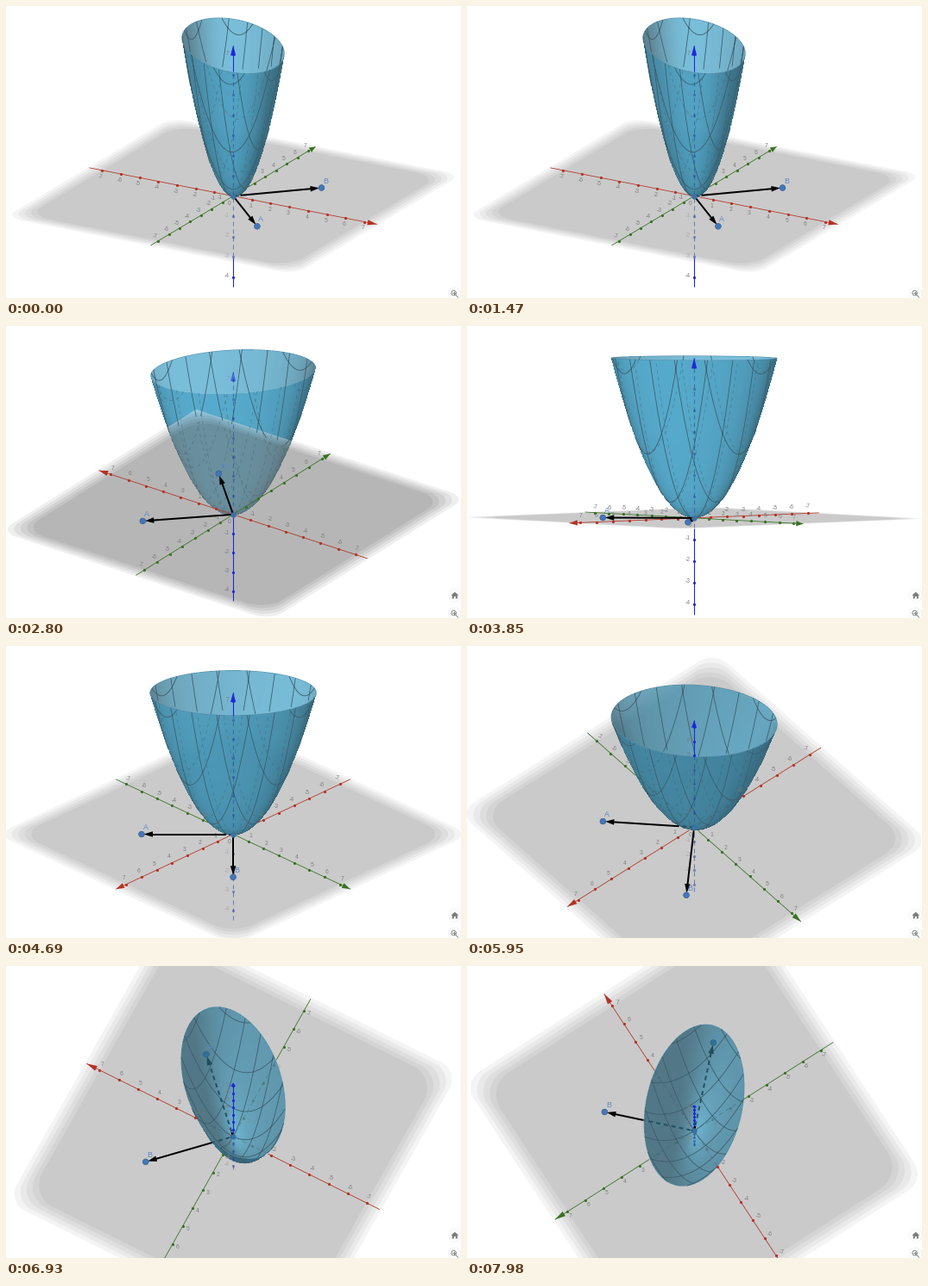
Write a matplotlib script that moves like this. It is 527 px wide and 339 px high and loops after 8 s.

```python
import numpy as np
import matplotlib.pyplot as plt
from matplotlib.animation import FuncAnimation
from matplotlib.patches import Circle, Polygon

W, H, DPI = 527, 339, 100
LOOP, STEP = 8000, 50
CX, CY, S = 263.1, 185.4, 25.0      # rotation centre and pixels per unit
ZC = 1.5                            # height of the rotation centre
ZTOP, REACH = 7.43, 7.68
ZLOW, ZHIGH = -4.5, 7.45
PX = 72 / DPI

# time (ms), azimuth, elevation
VIEW = np.array([
    (0, 330.2, 20.1), (1500, 330.2, 20.1), (1680, 332, 6), (2100, 290, -6),
    (2520, 222, -24), (2800, 215.9, -27), (3300, 218, -24), (4000, 222, 10),
    (4600, 225, 28), (4700, 225, 28), (5040, 223, 38), (5880, 220.3, 45.8),
    (5950, 220.1, 48.3), (6930, 152.1, 70.4), (7980, 122.9, 80.8)])

fig = plt.figure(figsize=(W / DPI, H / DPI), dpi=DPI, facecolor="white")
ax = fig.add_axes([0, 0, 1, 1])
ax.axis("off")


def rgb(*c):
    return tuple(v / 255 for v in c)


def form(p, q):
    """Bilinear form of x^2 + xy + y^2."""
    return p[0] * q[0] + p[1] * q[1] + (p[0] * q[1] + p[1] * q[0]) / 2


class Camera:
    def __init__(self, az, el):
        a, e = np.radians([az, el])
        ca, sa, ce, se = np.cos(a), np.sin(a), np.cos(e), np.sin(e)
        self.right = np.array([ca, -sa, 0])
        self.up = np.array([sa * se, ca * se, ce])
        self.eye = np.array([-sa * ce, -ca * ce, se])

    def project(self, p):
        q = np.array(p, float)
        q[2] = q[2] - ZC
        return np.array([CX + S * np.tensordot(self.right, q, 1),
                         CY - S * np.tensordot(self.up, q, 1)])

    def hits(self, p):
        """Ray parameters where the view ray through p meets the bowl."""
        v = self.eye
        a = form(v, v)
        b = 2 * form(p, v) - v[2]
        c = form(p, p) - p[2]
        disc = b * b - 4 * a * c
        root = np.sqrt(np.maximum(disc, 0))
        for t in ((-b - root) / (2 * a), (-b + root) / (2 * a)):
            yield t, (disc > 0) & (p[2] + t * v[2] <= ZTOP)

    def hidden(self, p):
        p = np.asarray(p, float)
        out = np.zeros(p.shape[1:], bool)
        for t, ok in self.hits(p):
            out |= ok & (t > 0.03)
        t = -p[2] / self.eye[2]
        x, y = p[0] + t * self.eye[0], p[1] + t * self.eye[1]
        return out | ((t > 0.03) & (abs(x) < 7.2) & (abs(y) < 7.2))


# ---- plane -------------------------------------------------------------
def rounded_square(h, r):
    th = np.linspace(0, 2 * np.pi, 80, endpoint=False) + 0.01
    x = (h - r) * np.sign(np.cos(th)) + r * np.cos(th)
    y = (h - r) * np.sign(np.sin(th)) + r * np.sin(th)
    return np.array([x, y, 0 * x])


# a pale veil with sharp corners, then a soft-edged shadow
BANDS = [rounded_square(7.7, 0)]
BANDS += [rounded_square(h, r) for h, r in
          zip(np.linspace(7.75, 6.98, 5), np.linspace(0.95, 1.25, 5))]
plane = [ax.add_patch(Polygon([(0, 0)], closed=True, lw=0, fc="black"))
         for _ in BANDS]
plane[0].set(facecolor="white", alpha=0.38)

# ---- bowl --------------------------------------------------------------
X0, X1, Y0, Y1 = 160, 368, 6, 264
gx, gy = np.meshgrid(np.arange(X0, X1) + 0.5, np.arange(Y0, Y1) + 0.5)
bowl = ax.imshow(np.zeros((Y1 - Y0, X1 - X0, 4)), extent=(X0, X1, Y1, Y0),
                 interpolation="nearest", zorder=2, aspect="auto")
ax.set_xlim(0, W)
ax.set_ylim(H, 0)
TINT = np.array(rgb(83, 182, 222))


def shade(cam):
    u, w = (gx - CX) / S, (CY - gy) / S
    p = cam.right[:, None, None] * u + cam.up[:, None, None] * w
    p[2] += ZC
    v = cam.eye
    light = -0.35 * cam.right + 0.1 * cam.up + 0.85 * v
    col = np.zeros(gx.shape + (3,))
    alpha = np.zeros(gx.shape)
    for t, ok in cam.hits(p):
        x, y = p[0] + t * v[0], p[1] + t * v[1]
        nx, ny = -(2 * x + y), -(x + 2 * y)
        size = np.sqrt(nx * nx + ny * ny + 1)
        face = np.sign(nx * v[0] + ny * v[1] + v[2])
        lit = (nx * light[0] + ny * light[1] + light[2]) * face / size
        lum = 0.51 + 0.46 * np.maximum(lit, 0)
        cover = 0.75 * ok
        col = (col * (1 - cover[..., None])
               + TINT * (lum * cover)[..., None])
        alpha = alpha + cover * (1 - alpha)
    col = col / np.maximum(alpha, 1e-6)[..., None]
    return np.dstack([np.clip(col, 0, 1), alpha])


def mesh_curves():
    gap = np.full((3, 1), np.nan)
    parts = []
    for k in range(-3, 4):
        half = np.sqrt(max(ZTOP - 0.75 * k * k, 0))
        s = -k / 2 + half * np.linspace(-1, 1, 90)
        z = k * k + k * s + s * s
        c = np.full_like(s, k)
        parts += [np.array([c, s, z]), gap, np.array([s, c, z]), gap]
    return np.hstack(parts)


MESH = mesh_curves()
th = np.linspace(0, 2 * np.pi, 160)
big, small = np.sqrt(ZTOP) * np.cos(th), np.sqrt(ZTOP / 3) * np.sin(th)
RIM = np.array([big + small, -big + small, ZTOP + 0 * th])


class Stroke:
    """A space curve: solid where seen, dashed where covered."""

    def __init__(self, color, lw, back, back_alpha, dash=(4, 4), z=7):
        self.front, = ax.plot([], [], color=color, lw=lw * PX, zorder=z,
                              solid_capstyle="butt")
        self.back, = ax.plot([], [], color=back, lw=lw * PX,
                             alpha=back_alpha, zorder=z - 1,
                             ls=(0, tuple(d / lw for d in dash)),
                             dash_capstyle="butt")

    def set(self, cam, pts):
        x, y = cam.project(pts)
        hid = cam.hidden(pts)
        self.front.set_data(np.where(hid, np.nan, x), y)
        self.back.set_data(np.where(hid, x, np.nan), y)


INK = rgb(60, 92, 106)
mesh = Stroke(INK, 0.8, INK, 0.45)
rim, = ax.plot([], [], color=rgb(80, 140, 168), lw=0.6 * PX, zorder=6)


# ---- axes --------------------------------------------------------------
def label(text, size, color, z):
    return ax.text(0, 0, text, size=size * PX, color=color, ha="center",
                   va="center", family="Liberation Sans", zorder=z)


def cone(tip, base, half):
    d = tip - base
    n = np.array([-d[1], d[0]]) / max(np.hypot(*d), 1e-6) * half
    return [tip, base + n, base - n]


NUM = rgb(125, 125, 125)


class Axis:
    def __init__(self, k, lo, hi, color, back, lw):
        self.k = k
        self.unit = np.eye(3)[:, [k]]
        self.line = self.unit * np.linspace(lo, hi, 240)
        self.tip = self.unit * hi
        nums = [n for n in range(-7, 8) if n and lo < n < hi]
        self.ticks = self.unit * np.array(nums, float)
        self.stroke = Stroke(color, lw, back, 0.55, dash=(5, 4), z=8)
        dot = dict(ls="", marker="o", mec="none")
        self.seen, = ax.plot([], [], ms=3.2 * PX, color=color, zorder=9, **dot)
        self.covered, = ax.plot([], [], ms=3.2 * PX, color=back, alpha=0.5,
                                zorder=8, **dot)
        self.head = ax.add_patch(Polygon([(0, 0)], fc=color, lw=0, zorder=9))
        self.text = [label(str(n), 6.8, NUM, 9) for n in nums]

    def set(self, cam):
        self.stroke.set(cam, self.line)
        x, y = cam.project(self.ticks)
        hid = cam.hidden(self.ticks)
        self.seen.set_data(x[~hid], y[~hid])
        self.covered.set_data(x[hid], y[hid])
        tip = cam.project(self.tip)[:, 0]
        base = cam.project(self.tip - 0.5 * self.unit)[:, 0]
        self.head.set_xy(cone(tip, base, 3.1))
        self.head.set_alpha(0.55 if cam.hidden(self.tip)[0] else 1)
        if self.k == 2:
            dx, dy = -7, -1
        else:                       # numbers sit beside the axis
            d = (tip - base) / np.hypot(*(tip - base))
            side = (7.5, -6.5)[self.k]
            dx, dy = -d[1] * side, d[0] * side
        for t, px, py, h in zip(self.text, x, y, hid):
            t.set_position((px + dx, py + dy))
            t.set_alpha(0.4 if h else 0.95)


axes3 = [Axis(0, -REACH, REACH, rgb(180, 50, 35), rgb(80, 95, 105), 0.8),
         Axis(1, -REACH, REACH, rgb(55, 115, 35), rgb(55, 105, 105), 0.8),
         Axis(2, ZLOW, ZHIGH, rgb(30, 40, 215), rgb(35, 70, 160), 1.1)]
zero = label("0", 6.8, NUM, 9)
origin, = ax.plot([], [], "o", ms=6.4 * PX, mec="none", color=rgb(60, 112, 165),
                  zorder=13)


# ---- vectors -----------------------------------------------------------
class Vector:
    DIM = rgb(32, 78, 96)

    def __init__(self, name, end):
        self.end = np.array(end, float)[:, None]
        self.stroke = Stroke("black", 2.0, self.DIM, 0.95, (5, 4), z=11)
        self.head = ax.add_patch(Polygon([(0, 0)], lw=0, zorder=11))
        self.dot = ax.add_patch(Circle((0, 0), 3.4, lw=0.4, zorder=12))
        self.text = label(name, 9, rgb(95, 138, 200), 12)

    def set(self, cam):
        p = cam.project(self.end)[:, 0]
        o = cam.project(np.zeros((3, 1)))[:, 0]
        length = max(np.hypot(*(p - o)), 20)
        way = (p - o) / length
        self.stroke.set(cam, self.end * np.linspace(0, 1 - 11 / length, 120))
        hid = cam.hidden(self.end)[0]
        self.head.set_xy(cone(p - 2.5 * way, p - 13 * way, 3.3))
        self.head.set_facecolor(self.DIM if hid else "black")
        self.dot.center = tuple(p)
        self.dot.set_facecolor(rgb(48, 112, 150) if hid else rgb(68, 118, 184))
        self.dot.set_edgecolor(rgb(45, 90, 140))
        self.text.set_position(tuple(p + (4.5, -8)))


vectors = [Vector("A", (3, -3, 0)), Vector("B", (3, 3, 0))]

# ---- buttons -----------------------------------------------------------
GREY = rgb(125, 125, 125)


def button(x, y):
    return ax.add_patch(Circle((x, y), 7.2, fc="white", ec=rgb(238, 238, 238),
                               lw=0.5, zorder=20))


button(519.5, 334)
ax.add_patch(Circle((518.6, 333.2), 2.8, fc="none", ec=GREY, lw=0.9 * PX,
                    zorder=21))
for xs, ys in (((520.7, 523.5), (335.3, 338.1)), ((517.3, 519.9), (333.2, 333.2)),
               ((518.6, 518.6), (331.9, 334.5))):
    ax.plot(xs, ys, color=GREY, lw=0.9 * PX, zorder=21)
half = [(0, -4.2), (4.4, -0.2), (3.1, -0.2), (3.1, 3.6), (1, 3.6), (1, 1)]
house = half + [(-x, y) for x, y in half[:0:-1]]
home = [button(519.8, 312.7),
        ax.add_patch(Polygon([(519.8 + x, 312.9 + y) for x, y in house],
                             fc=GREY, lw=0, zorder=21))]


def draw(i):
    t = 70 * round(i * STEP / 70)
    az = np.interp(t, VIEW[:, 0], VIEW[:, 1])
    el = np.interp(t, VIEW[:, 0], VIEW[:, 2])
    cam = Camera(az, el if abs(el) > 0.2 else 0.2)
    above = el > 0
    for patch, band in zip(plane, BANDS):
        patch.set_xy(cam.project(band).T)
        patch.set_zorder(1 if above else 4)
    for patch in plane[1:]:
        patch.set_alpha(0.0447 if above else 0.0625)
    bowl.set_data(shade(cam))
    mesh.set(cam, MESH)
    x, y = cam.project(RIM)
    rim.set_data(np.where(cam.hidden(RIM), np.nan, x), y)
    for part in axes3 + vectors:
        part.set(cam)
    ox, oy = cam.project(np.zeros((3, 1)))[:, 0]
    origin.set_data([ox], [oy])
    zero.set_position((ox - 4, oy + 9))
    for h in home:
        h.set_visible(t > 1540)
    return []


anim = FuncAnimation(fig, draw, frames=LOOP // STEP, interval=STEP,
                     init_func=lambda: draw(0), repeat=True, repeat_delay=0,
                     blit=False)
plt.show()
```
